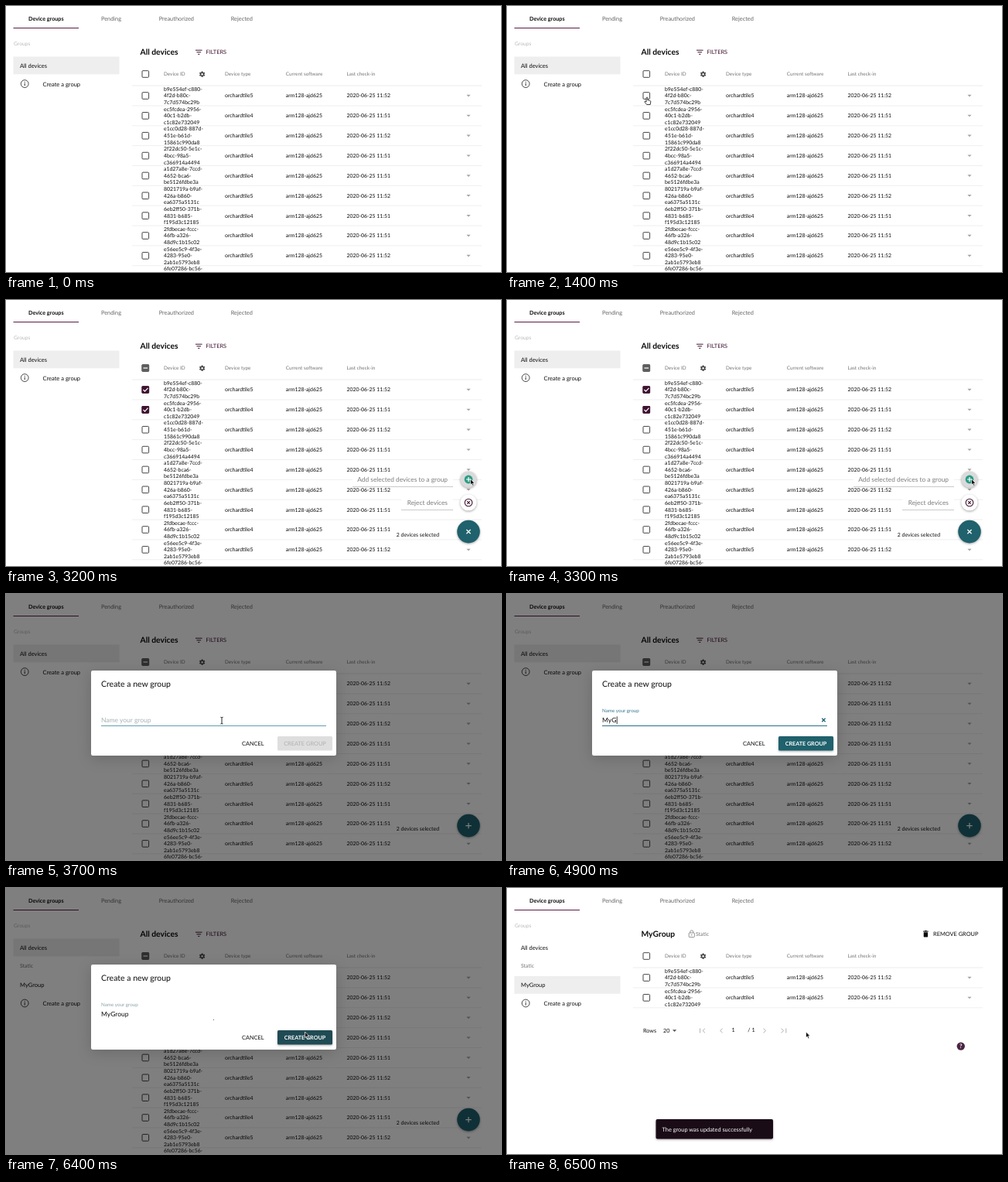
An HTML page that plays this animation: 640 by 344 pixels, repeating every 7100 ms.

```html
<!DOCTYPE html>
<html lang="en">
<head>
<meta charset="utf-8">
<title>Create a device group</title>
<style>
html, body { margin: 0; width: 100%; height: 100%; overflow: hidden; background: #fff; }
svg { display: block; width: 100vw; height: 100vh; }
text { font-family: Lato, "Open Sans", sans-serif; text-rendering: geometricPrecision; white-space: pre; }
.sheet { filter: drop-shadow(0 4px 9px rgba(0,0,0,.16)); }
.lift { filter: drop-shadow(0 1px 1.5px rgba(0,0,0,.35)); }
</style>
</head>
<body>
<svg id="stage" viewBox="0 0 640 344" preserveAspectRatio="none"></svg>
<script>
const LOOP = 7100, STEP = 100, ROW = 25.86;
const INK = '#0c0c0c', WINE = '#3f1230', TEAL = '#1f616c', GREY = '#747474';

// y is the optical middle of the line
const text = (x, y, s, o = {}) => {
  const { size = 6.9, fill = INK, weight = 400, anchor = 'start', id = '' } = o;
  return `<text ${id && `id="${id}"`} x="${x}" y="${(y + size * .34).toFixed(2)}" font-size="${size}"
    font-weight="${weight}" fill="${fill}" text-anchor="${anchor}">${s}</text>`;
};
const rect = (x, y, w, h, fill, more = '') =>
  `<rect x="${x}" y="${y}" width="${w}" height="${h}" fill="${fill}" ${more}/>`;
const circle = (x, y, r, fill, more = '') => `<circle cx="${x}" cy="${y}" r="${r}" fill="${fill}" ${more}/>`;
const line = (d, color, w = 1, more = '') =>
  `<path d="${d}" fill="none" stroke="${color}" stroke-width="${w}" ${more}/>`;
const group = (id, body, more = '') => `<g id="${id}" ${more}>${body}</g>`;
const caret = (x, y, color) => `<path d="M${x - 2.6} ${y - 1.2}h5.2l-2.6 2.7z" fill="${color}"/>`;

const box = y => rect(176, y - 4.3, 8.6, 8.6, '#fff', 'rx="1" stroke="#444" stroke-width="1"');
const checked = (id, y) => group(id, rect(175.5, y - 4.8, 9.6, 9.6, WINE, 'rx="1.2"') +
  line(`M177.5 ${y}l2 2.2 4-4.4`, '#fff', 1.2));

const devices = [
  'b9e554ef-c880- 4f2d-b80c- 7c7d574bc29b', 'ec5fcdea-2956- 40c1-b2db- c1c82e732049',
  'e1cc0d28-887d- 451e-b61d- 15861c990da8', '2f22dc50-5e1c- 4bcc-98a5- c366914a4494',
  'a1d27a8e-7ccd- 4652-bca6- be5126fdbe3a', '8021719a-b9af- 426a-b860- ea6375a5131c',
  '6eb2ff50-371b- 4831-b685- f195d3c12185', '2fdbecae-fccc- 46fb-a326- 48d9c1b15c02',
  'e56ee5c9-4f3e- 4283-95e0- 2ab1e5793eb8', '6fe07286-bc56-'
];
const rowY = i => 116 + ROW * i;

function row(id, i) {
  const y = rowY(i), newer = i === 0 || i % 3 === 2;
  const lines = id.split(' ').map((s, n) => text(204, y + (n - 1) * ROW / 3, s)).join('');
  if (i > 8) return lines;
  return lines + box(y) +
    text(283, y, 'orchardtile' + (newer ? 5 : 4)) +
    text(361.8, y, 'arm128-ajd625') +
    text(440.5, y, '2020-06-25 11:5' + (newer ? 2 : 1)) +
    caret(598, y, '#a5a5a5') +
    line(`M163 ${y + ROW / 2}H615`, '#ebebeb', .8);
}

function gear(x, y) {
  let teeth = '';
  for (let a = 0; a < 360; a += 60)
    teeth += rect(x - .9, y - 3.7, 1.8, 2, '#444', `transform="rotate(${a} ${x} ${y})"`);
  return teeth + circle(x, y, 2, '#fff', 'stroke="#444" stroke-width="1.4"');
}

const head = { size: 6.4, fill: GREY }, tab = { size: 7.4, fill: '#666', anchor: 'middle' };
const side = { size: 7.5 }, title = { size: 10.3, weight: 700 }, button = { size: 7.4 };

const tabs =
  text(51.8, 16.5, 'Device groups', { ...tab, size: 7.2, weight: 700, fill: INK }) +
  text(136, 16.5, 'Pending', tab) + text(220.3, 16.5, 'Preauthorized', tab) +
  text(304.8, 16.5, 'Rejected', tab) + rect(9.5, 28, 84.5, 1, '#5a1c43');

const sidebar =
  text(10, 49, 'Groups', { fill: '#b9b9b9', size: 6.7 }) +
  rect(9.5, 65.5, 137, 22.8, '#eee', 'id="pick"') +
  text(18, 77, 'All devices', side) +
  group('added', text(18, 101, 'Static', { fill: GREY }) + text(18, 125.3, 'MyGroup', side)) +
  group('create', circle(24.2, 100.6, 4.9, 'none', 'stroke="#333" stroke-width=".9"') +
    rect(23.7, 99.8, 1, 3.4, '#333') + rect(23.7, 97.9, 1, 1.1, '#333') +
    text(47.5, 101, 'Create a group', side));

const allHead = group('allHead',
  text(173.5, 59.7, 'All devices', title) +
  line('M245 57.2h8.6M246.5 59.8h5.6M248.2 62.4h2.2', WINE, 1) +
  text(258.5, 59.7, 'FILTERS', { ...button, fill: WINE }));

const groupHead = group('groupHead',
  text(173.5, 59.7, 'MyGroup', title) +
  rect(235.2, 58, 7.2, 5.6, 'none', 'rx=".8" stroke="#888" stroke-width=".9"') +
  line('M236.8 58v-1.2a2 2 0 0 1 4 0V58', '#888', .9) + circle(238.8, 60.8, .8, '#888') +
  text(244, 59.7, 'Static', { fill: GREY }) +
  rect(538.7, 57.2, 5.4, 6.3, INK, 'rx=".7"') + rect(538, 55.6, 6.8, 1, INK) + rect(540, 54.9, 2.8, 1, INK) +
  text(551, 59.7, 'REMOVE GROUP', button));

const table =
  box(88) + text(204, 88.3, 'Device ID', head) + gear(253.6, 88.2) +
  text(283, 88.3, 'Device type', head) + text(361.8, 88.3, 'Current software', head) +
  text(440.5, 88.3, 'Last check-in', head) + line('M163 103H615', '#e6e6e6', .8) +
  devices.slice(0, 2).map(row).join('') +
  group('rest', devices.slice(2).map((d, i) => row(d, i + 2)).join('')) +
  group('some', rect(175.5, 83.2, 9.6, 9.6, '#5e5e5e', 'rx="1.2"') + rect(177.5, 87.4, 5.6, 1.2, '#fff')) +
  checked('check0', rowY(0)) + checked('check1', rowY(1));

const pager = group('pager',
  text(176, 184.5, 'Rows', { size: 7.2 }) + text(202, 184.5, '20', { size: 7.2 }) + caret(216.6, 184.5, '#555') +
  line('M249.6 181.5v6M256 181.7l-3 2.8 3 2.8M278.7 181.7l-3 2.8 3 2.8', '#aaa', .9) +
  text(292.7, 183.8, '1', { size: 7.2, anchor: 'middle' }) + text(311.3, 183.8, '/ 1', { size: 7.2 }) +
  line('M331.5 181.7l3 2.8-3 2.8M354.6 181.7l3 2.8-3 2.8M360.8 181.5v6', '#aaa', .9) +
  circle(586.8, 204.6, 5.2, '#4a2440') +
  text(586.8, 204.7, '?', { size: 7.6, weight: 700, fill: '#fff', anchor: 'middle' }));

const snack = group('snack', rect(192.5, 299, 151.5, 25.5, '#1a0c17', 'rx="2" class="lift"') +
  text(200.5, 312, 'The group was updated successfully', { size: 7.4, fill: '#fff' }));

const action = (id, y, x, label, fill, icon) => group(id,
  rect(x, y - 9, 578 - x, 18.5, '#fff', 'fill-opacity=".9"') +
  line(`M${x} ${y + 9.5}H578`, '#c4c4c4', .9) +
  text(571, y, label, { size: 8.4, fill: '#7c7c7c', anchor: 'end' }) +
  circle(598, y, 10.6, fill, 'class="lift"') + icon);

const dial =
  action('add', 232, 448, 'Add selected devices to a group', '#dadada',
    circle(598, 232, 5.4, '#2c9c86') + line('M595 232h6M598 229v6', '#fff', 1.2)) +
  action('reject', 262, 511, 'Reject devices', '#fff',
    circle(598, 262, 4.8, '#fff', `stroke="${WINE}" stroke-width="1.1"`) +
    line('M596.2 260.2l3.6 3.6M599.8 260.2l-3.6 3.6', WINE, 1.1)) +
  text(560, 303.3, '', { id: 'count', anchor: 'end' }) +
  group('fab', circle(0, 0, 14.8, TEAL, 'class="lift"') +
    group('plus', line('M-3.7 0H3.7M0-3.7V3.7', '#fff', 1.2)));

const dialog = rect(0, 0, 640, 344, '#000', 'id="dim"') + group('dialog',
  rect(110, 99, 317, 110, '#fff', 'rx="2.2" class="sheet"') +
  text(123, 116.6, 'Create a new group', { size: 10.5 }) +
  group('label', text(0, 0, 'Name your group', { size: 8.5, fill: 'inherit' })) +
  text(123, 163.3, '', { size: 8.5, id: 'name' }) + rect(0, 158.3, .8, 9.8, INK, 'id="beam"') +
  rect(123, 170, 291, 1, TEAL, 'id="under"') +
  group('clear', line('M407.2 160.8l4.4 4.4M411.6 160.8l-4.4 4.4', '#1d5f78', 1.3)) +
  text(305, 193.2, 'CANCEL', button) +
  rect(351, 184, 71, 18.5, TEAL, 'id="ok" rx="1.5"') +
  text(386.5, 193.2, 'CREATE GROUP', { size: 7.2, weight: 700, anchor: 'middle', id: 'okText' }));

const edge = 'stroke="#fff" stroke-width=".7" stroke-linejoin="round"';
const pointer = group('pointer',
  group('arrow', `<path d="M0 0V7.6L1.8 6 3.1 8.9 4.4 8.3 3.2 5.5H5.5Z" fill="#111" ${edge}/>`) +
  group('hand', `<path d="M-.9.3C-.9-.8.9-.8.9.3V3.2L3.8 3.9Q5 4.2 4.8 5.4L4.2 9H-.3L-3 5.7Q-3.4 4.6-2.2 4.6L-.9 5.6Z"
    fill="#fff" stroke="#111" stroke-width=".8" stroke-linejoin="round"/>`) +
  group('ibeam', line('M-1.6-4.4Q0-4.4 0-3.4V3.4Q0 4.4-1.6 4.4M1.6-4.4Q0-4.4 0-3.4M0 3.4Q0 4.4 1.6 4.4', '#111', .9)));

const stage = document.getElementById('stage');
stage.innerHTML = rect(0, 0, 640, 344, '#fff') + tabs + sidebar + allHead + groupHead + table +
  pager + dial + dialog + snack + pointer;

const el = {};
stage.querySelectorAll('[id]').forEach(n => el[n.id] = n);
const set = (id, attrs) => { for (const k in attrs) el[id].setAttribute(k, attrs[k]); };
const show = (id, on) => set(id, { opacity: on ? 1 : 0 });
const ramp = (t, a, b) => Math.min(1, Math.max(0, (t - a) / (b - a)));
const ease = p => p * p * (3 - 2 * p);
const last = (list, t) => list.reduce((hit, k) => k[0] <= t ? k : hit, list[0]);

const path = [
  [400, 353, 312, 'arrow'], [600, 337, 208, 'arrow'], [1000, 182, 121, 'arrow'], [1200, 181, 118.5, 'hand'],
  [1700, 181, 118.5, 'hand'], [1900, 181, 144, 'hand'], [2200, 181, 144, 'arrow'],
  [2700, 598, 298, 'hand'], [3000, 598, 298, 'arrow'], [3200, 600.5, 231.5, 'arrow'],
  [3400, 600.5, 231.5, 'arrow'], [3500, 589, 228, 'arrow'], [3700, 279, 163.7, 'ibeam'],
  [4400, 279, 163.7, ''], [5600, 279, 163.7, 'ibeam'], [5800, 300, 166, 'arrow'],
  [6100, 386.5, 186, 'arrow'], [LOOP, 386.5, 186, 'arrow']
];
const typing = [[0, 0], [4400, 1], [4600, 2], [4900, 3], [5000, 4], [5200, 5], [5400, 6], [5600, 7]];

function movePointer(t) {
  const k = last(path, t), next = path[path.indexOf(k) + 1] || k;
  const p = ease(ramp(t, k[0], next[0]));
  set('pointer', { transform: `translate(${k[1] + (next[1] - k[1]) * p} ${k[2] + (next[2] - k[2]) * p})` });
  for (const kind of ['arrow', 'hand', 'ibeam']) show(kind, t >= 400 && k[3] === kind);
}

function drawPage(t, done) {
  const added = t >= 6300;
  show('added', added);
  set('create', { transform: `translate(0 ${added ? 48.4 : 0})` });
  set('pick', { y: done ? 114 : 65.5 });
  show('allHead', !done);
  for (const id of ['groupHead', 'pager', 'snack']) show(id, done);
  show('rest', !done);
  show('some', t >= 1500 && !done);
  show('check0', t >= 1500 && !done);
  show('check1', t >= 2000 && !done);
}

function drawDial(t, done) {
  const grow = done ? 0 : ramp(t, 1400, 1600), close = ramp(t, 3300, 3500);
  const open = ramp(t, 2700, 2900) - close;
  set('fab', { transform: `translate(598 299.6) scale(${grow})` });
  show('count', grow === 1);
  el.count.textContent = t < 2000 ? '1 device selected' : '2 devices selected';
  set('plus', { transform: `rotate(${45 * open})` });
  set('reject', { opacity: open });
  set('add', { opacity: ramp(t, 2800, 3000) - close });
}

function drawDialog(t, done) {
  const fade = done ? 0 : ramp(t, 3300, 3500);
  set('dim', { opacity: fade * .5 });
  set('dialog', { opacity: fade });
  const n = last(typing, t)[1], up = ramp(t, 4300, 4500), busy = t >= 6300;
  el.name.textContent = 'MyGroup'.slice(0, n);
  set('label', {
    transform: `translate(123 ${163.5 - 13 * up}) scale(${1 - .26 * up})`,
    fill: busy ? '#8ba3a8' : up ? '#3a7890' : '#a9b0b2'
  });
  set('beam', { x: 123.4 + el.name.getComputedTextLength() });
  show('beam', n && t < 5800);
  show('clear', n && !busy);
  const w = 291 * ramp(t, 3400, 3600) * (1 - ramp(t, 6100, 6400)) + (busy ? 1 : 0);
  set('under', { x: 268.5 - w / 2, width: w, fill: n ? '#2a6f86' : '#62a0ae' });
  set('ok', { fill: !n ? '#dedede' : t >= 6100 ? '#204b54' : TEAL, class: n ? 'lift' : '' });
  set('okText', { fill: n ? '#fff' : '#b0b0b0', 'font-weight': n ? 700 : 400, 'font-size': n ? 7.2 : 7.4 });
}

function draw(t) {
  const done = t >= 6500;
  drawPage(t, done);
  drawDial(t, done);
  drawDialog(t, done);
  movePointer(t);
}

const start = performance.now();
function tick() {
  const t = (performance.now() - start) % LOOP;
  draw(Math.floor(t / STEP) * STEP);
  requestAnimationFrame(tick);
}
tick();
</script>
</body>
</html>
```
